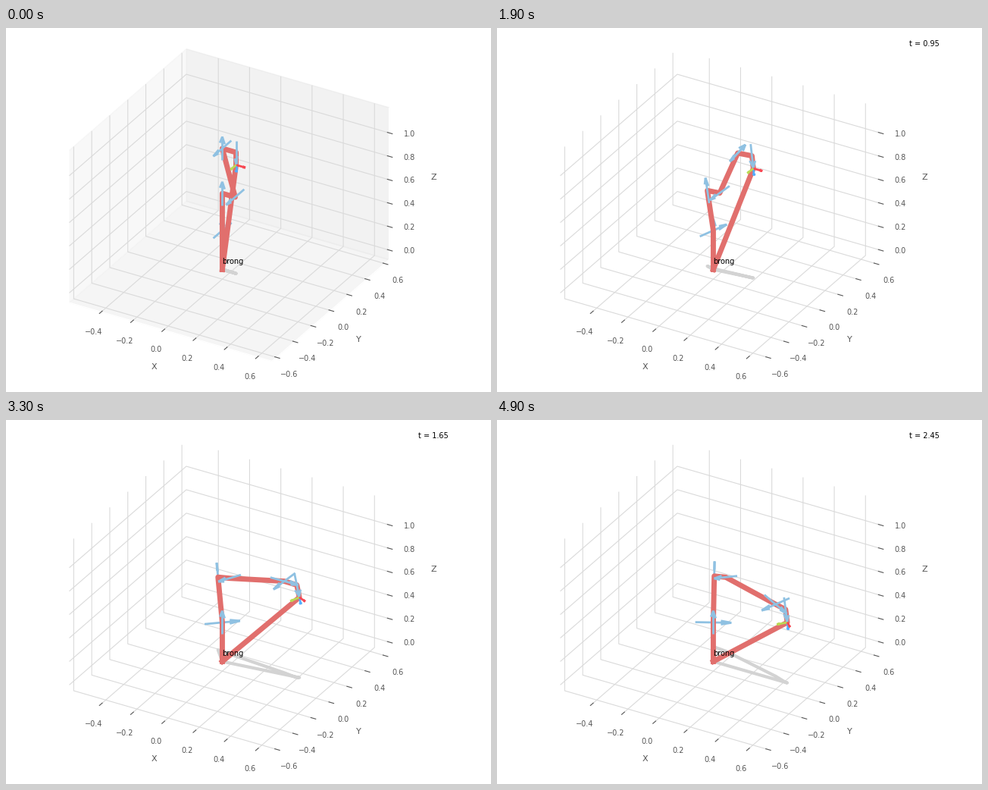
Recreate the animation shown at these times as a matplotlib script. Size 640 px wide and 480 px high, loop 5000 ms.

```python
import numpy as np
import matplotlib.pyplot as plt
from matplotlib.animation import FuncAnimation

FRAMES, INTERVAL = 50, 100

plt.rcParams.update({
    "font.family": "DejaVu Sans",
    "font.size": 7,
    "axes.labelsize": 8,
    "axes.labelcolor": "#555555",
    "axes.edgecolor": "white",
    "axes.linewidth": 1,
    "xtick.color": "#555555",
    "ytick.color": "#555555",
    "grid.color": "#dadada",
    "grid.linewidth": 0.8,
})

# Arm geometry in modified Denavit-Hartenberg form: a, d, alpha
QUARTER = np.pi / 2
LINKS = [
    (0, 0.333, 0),
    (0, 0, -QUARTER),
    (0, 0.316, QUARTER),
    (0.0825, 0, QUARTER),
    (-0.0825, 0.384, -QUARTER),
    (0, 0, QUARTER),
    (0.088, 0, QUARTER),
]
FLANGE = 0.107
Q_END = np.array([-1.0805, -0.5328, 0.9086, -2.1781, 0.4612, 1.9018, 0.4239])

JOINT_AXIS, TOOL_AXIS = 0.2, 0.06
JOINT_COLOR = "#8FC1E2"
TOOL_COLORS = ("#F84752", "#BADA55", "#54AEFF")


def link_transform(a, d, alpha, theta):
    ct, st, ca, sa = np.cos(theta), np.sin(theta), np.cos(alpha), np.sin(alpha)
    return np.array([
        [ct, -st, 0, a],
        [st * ca, ct * ca, -sa, -sa * d],
        [st * sa, ct * sa, ca, ca * d],
        [0, 0, 0, 1],
    ])


def joint_poses(q):
    pose, poses = np.eye(4), []
    for link, theta in zip(LINKS, q):
        pose = pose @ link_transform(*link, theta)
        poses.append(pose)
    return poses


def ease(u):
    return u**3 * (10 - 15 * u + 6 * u**2)


fig = plt.figure(figsize=(6.4, 4.8), dpi=100, facecolor="white")
fig.subplots_adjust(left=-0.09, bottom=0, top=1, right=0.99)
ax = fig.add_subplot(projection="3d", proj_type="ortho", computed_zorder=False)
ax.set_facecolor("white")

# Equal scale on all axes: the tallest extent plus margins
half = 1.133 * 1.1 / 2 * 25 / 24
ax.set(
    xlim=(0.044 - half, 0.044 + half),
    ylim=(-half, half),
    zlim=(0.5665 - half, 0.5665 + half),
    xlabel="X", ylabel="Y", zlabel="Z",
)
ax.set_xticks(np.arange(-2, 4) * 0.2)
ax.set_yticks(np.arange(-3, 4) * 0.2)
ax.set_zticks(np.arange(6) * 0.2)
ax.M = ax.get_proj()

shadow, = ax.plot([], [], [], color="lightgrey", linewidth=3, zorder=2)
arm, = ax.plot([], [], [], color="#E16F6D", linewidth=5, zorder=2)
ax.text(0, 0, 0.05, "brong", color="black", zorder=3)
timer = fig.text(0.85, 0.95, "", color="black")
arrows = []


def add_arrow(start, vector, color):
    arrows.append(ax.quiver(*start, *vector, color=color, linewidth=2))


def update(frame):
    poses = joint_poses(Q_END * ease(frame / (FRAMES - 1)))
    origins = [pose[:3, 3] for pose in poses]
    tool = poses[-1][:3, :3]
    tip = origins[-1] + FLANGE * tool[:, 2]

    base = np.zeros(3)
    x, y, z = np.array([base, *origins, tip, base]).T
    arm.set_data_3d(x, y, z)
    shadow.set_data_3d(x, y, 0 * z)

    while arrows:
        arrows.pop().remove()
    for color, axis in zip(TOOL_COLORS, tool.T):
        add_arrow(tip, TOOL_AXIS * axis, color)
    for origin, pose in zip(origins, poses):
        vector = JOINT_AXIS * pose[:3, 2]
        add_arrow(origin - vector / 2, vector, JOINT_COLOR)

    # The two farthest arrows fall behind the arm
    by_depth = sorted(arrows, key=lambda a: a.do_3d_projection(), reverse=True)
    for rank, arrow in enumerate(by_depth):
        arrow.set_zorder(rank)

    for axis in (ax.xaxis, ax.yaxis, ax.zaxis):
        axis.pane.set_visible(frame == 0)
    timer.set_text(f"t = {frame * 0.05:.2f}" if frame else "")
    return []


anim = FuncAnimation(fig, update, frames=FRAMES, interval=INTERVAL,
                     init_func=lambda: [], repeat=True, repeat_delay=0)
plt.show()
```
